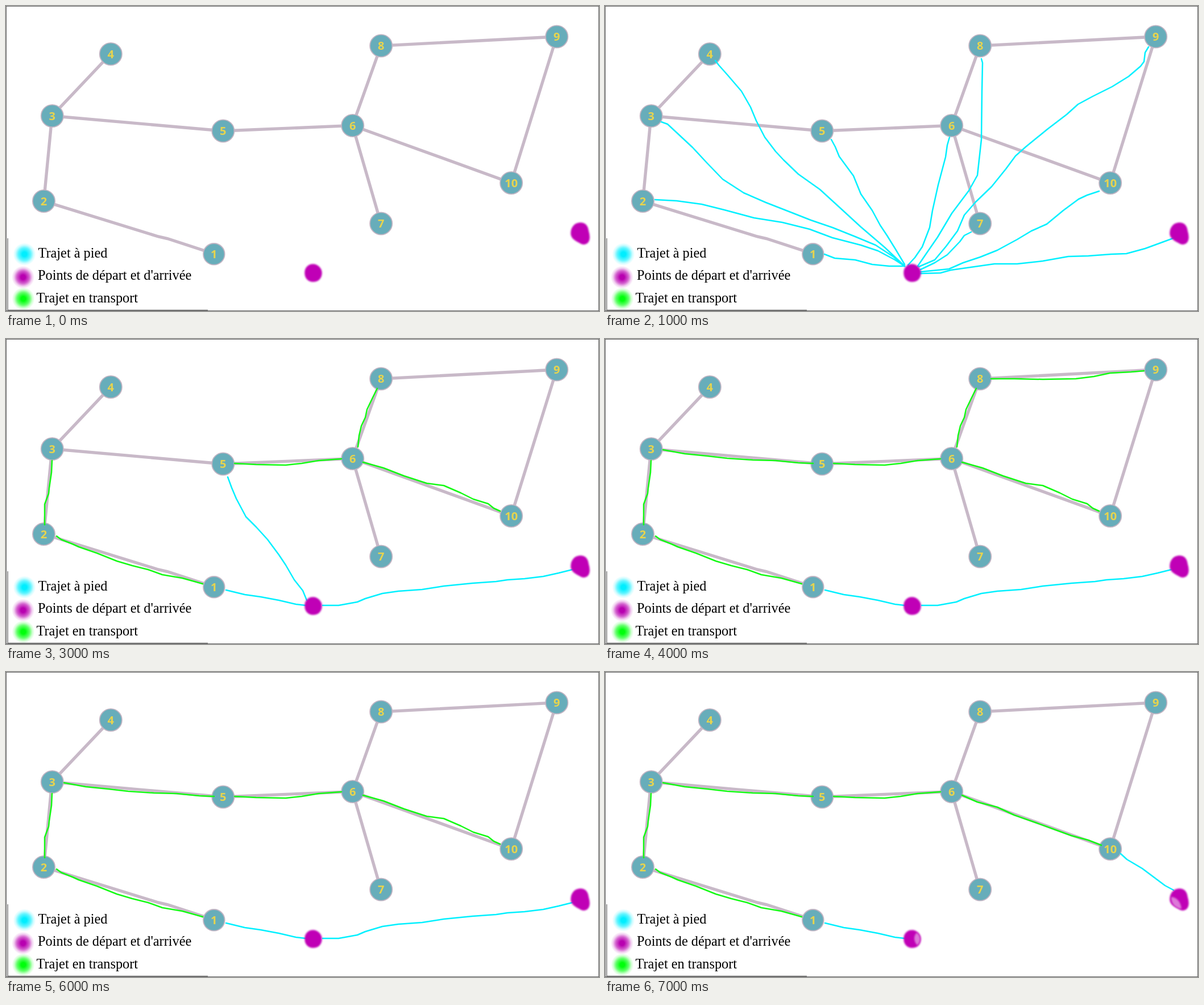
Recreate the animation shown at these times as an HTML page. Size 1043 by 537 pixels, loop 8 s.

```html
<!DOCTYPE html>
<html lang="fr">
<head>
<meta charset="utf-8">
<title>Trajets</title>
<style>
  html, body { margin: 0; width: 100%; height: 100%; overflow: hidden; background: #fff; }
  svg { display: block; width: 1043px; height: 537px; }
  .edges { stroke: #c8b9c8; stroke-width: 5.4; fill: none; }
  .nodes circle { fill: #67adba; stroke: #c0b4c3; stroke-width: 1.8; }
  .nodes text { font: bold 20px "Open Sans", "Noto Sans", sans-serif; fill: #e8d44d; text-anchor: middle; }
  .legend text { font: 24.3px "Liberation Serif", serif; fill: #000; }
  .frame { fill: none; stroke: #666; }
  .blob { fill: #c000b6; stroke: #c000b6; stroke-width: 1.5; filter: url(#soft); }
  .worn { fill: #dc7ad8; filter: url(#soft); }
  polyline { fill: none; stroke-width: 2.5; stroke-linecap: round; stroke-linejoin: round; }
  .walk { stroke: #00f0ff; }
  .ride { stroke: #14fa14; }

  /* one step = 1 s = 12.5 % ; groups are named after the steps they cover */
  .on { visibility: hidden; animation: 8s step-end infinite; }
  .s1 { animation-name: s1; }
  .s2 { animation-name: s2; }
  .s3 { animation-name: s3; }
  .s4 { animation-name: s4; }
  .s7 { animation-name: s7; }
  .s34 { animation-name: s34; }
  .s346 { animation-name: s346; }
  .s26 { animation-name: s26; }
  .s27 { animation-name: s27; }
  .s37 { animation-name: s37; }
  .s47 { animation-name: s47; }
  @keyframes s1 { 0%, 25%, 100% { visibility: hidden } 12.5% { visibility: visible } }
  @keyframes s2 { 0%, 37.5%, 100% { visibility: hidden } 25% { visibility: visible } }
  @keyframes s3 { 0%, 50%, 100% { visibility: hidden } 37.5% { visibility: visible } }
  @keyframes s4 { 0%, 62.5%, 100% { visibility: hidden } 50% { visibility: visible } }
  @keyframes s7 { 0%, 100% { visibility: hidden } 87.5% { visibility: visible } }
  @keyframes s34 { 0%, 62.5%, 100% { visibility: hidden } 37.5% { visibility: visible } }
  @keyframes s346 { 0%, 62.5%, 87.5%, 100% { visibility: hidden } 37.5%, 75% { visibility: visible } }
  @keyframes s26 { 0%, 87.5%, 100% { visibility: hidden } 25% { visibility: visible } }
  @keyframes s27 { 0%, 100% { visibility: hidden } 25% { visibility: visible } }
  @keyframes s37 { 0%, 100% { visibility: hidden } 37.5% { visibility: visible } }
  @keyframes s47 { 0%, 100% { visibility: hidden } 50% { visibility: visible } }
</style>
</head>
<body>
<svg viewBox="0 0 1043 537">
  <defs>
    <filter id="soft" x="-30%" y="-30%" width="160%" height="160%"><feGaussianBlur stdDeviation="1.6"/></filter>
    <radialGradient id="cyan"><stop offset=".2" stop-color="#00eeff"/><stop offset=".55" stop-color="#00eeff" stop-opacity=".62"/><stop offset=".8" stop-color="#00eeff" stop-opacity=".18"/><stop offset="1" stop-color="#00eeff" stop-opacity="0"/></radialGradient>
    <radialGradient id="plum"><stop offset=".2" stop-color="#b800b0"/><stop offset=".55" stop-color="#b800b0" stop-opacity=".62"/><stop offset=".8" stop-color="#b800b0" stop-opacity=".18"/><stop offset="1" stop-color="#b800b0" stop-opacity="0"/></radialGradient>
    <radialGradient id="lime"><stop offset=".2" stop-color="#00ff0c"/><stop offset=".55" stop-color="#00ff0c" stop-opacity=".62"/><stop offset=".8" stop-color="#00ff0c" stop-opacity=".18"/><stop offset="1" stop-color="#00ff0c" stop-opacity="0"/></radialGradient>
  </defs>

  <path class="edges" d="M184 84.5L81 193.500L66.500 343.500L268 406L284 409.500L365 436M81 193.500L382 220L609.500 210.500L659.500 70L968.500 54L888.500 311.500L609.500 210.500L659.500 383"/>

  <g class="nodes" id="nodes"></g>

  <g class="legend">
    <path d="M3 409V536M3 535.5H355" stroke="#777" stroke-width="1.5" fill="none"/>
    <circle cx="32.500" cy="437" r="20" fill="url(#cyan)"/>
    <circle cx="30" cy="477.500" r="20" fill="url(#plum)"/>
    <circle cx="30.500" cy="515.500" r="20" fill="url(#lime)"/>
    <text x="56.500" y="443">Trajet à pied</text>
    <text x="56" y="482">Points de départ et d'arrivée</text>
    <text x="53.500" y="521.500">Trajet en transport</text>
  </g>

  <g class="walk">
    <g class="on s1">
      <polyline points="194,96 200,104 216,122 240,150 256,178 266,202 281,231 300,256 314,271 340,296 378,323 413,355 450,389 492,425 527,458"/>
      <polyline points="99,204 110,208 124,221 154,249 180,277 207,305 244,329 283,346 329,364 362,377 400,390 440,406 476,421 508,442 527,458"/>
      <polyline points="88,341 126,343 170,349 210,359 262,373 312,381 360,393 400,408 450,421 480,431 510,447 527,458"/>
      <polyline points="386,437 404,444 440,447 470,455 500,458 527,458"/>
      <polyline points="398,235 405,248 412,265 437,299 450,331 470,360 484,386 496,404 509,425 527,455"/>
      <polyline points="606,231 602,245 599,266 586,315 576,360 571,390 558,424 545,443 533,456"/>
      <polyline points="662,93 664,100 663,150 662,235 655,298 640,325 610,365 585,407 565,436 550,458"/>
      <polyline points="956,72 950,82 948,98 942,106 921,124 892,142 858,159 832,173 812,191 778,217 740,248 722,264 705,287 680,318 652,345 632,368 620,396 600,423 580,447 552,459"/>
      <polyline points="644,398 632,404 624,415 602,438 580,452 555,464"/>
      <polyline points="869,326 848,333 833,340 806,360 777,384 750,396 725,411 690,430 660,442 630,452 605,463 555,468"/>
      <polyline points="999,409 980,416 950,427 917,436 890,437 850,440 815,441 770,449 725,454 685,454 650,459 608,465 590,470 555,471"/>
    </g>
    <g class="on s2">
      <polyline points="101,201 124,211 160,237 190,257 217,271 250,292 284,316 350,365 410,395 435,410 460,428 490,450 530,463"/>
      <polyline points="396,234 399,246 406,270 427,300 460,345 480,372 492,390 510,425 531,460"/>
      <polyline points="657,93 650,118 645,150 642,200 635,245 626,280 615,303 600,328 588,358 575,395 562,424 549,458"/>
    </g>
    <polyline class="on s3" points="390,243 397,262 405,281 422,313 440,331 460,353 480,380 492,398 507,424 522,443 529,460"/>
    <polyline class="on s27" points="387,442 420,450 448,454 480,460 510,467 527,469"/>
    <polyline class="on s26" points="557,469 585,469 618,463 632,457 662,448 690,444 732,441 770,435 820,430 862,427 882,424 912,422 945,418 972,412 996,406"/>
    <polyline class="on s7" points="907,320 918,330 945,346 965,361 985,376 1000,384"/>
  </g>

  <g class="ride">
    <g class="on s2">
      <polyline points="95,178 112,168 130,154 143,137 158,123 166,112 176,102"/>
      <polyline points="401,220 430,220 468,222 505,218 528,215 560,214 580,211 594,212"/>
    </g>
    <polyline class="on s2" points="679,70 720,70 770,71 828,70 860,66 888,60 925,58 948,56"/>
    <polyline class="on s4" points="679,70 720,70 770,71 828,70 860,66 888,60 925,58 948,56"/>
    <polyline class="on s27" points="89,347 97,353 117,361 128,366 160,377 195,391 222,399 250,406 275,415 310,421 346,431"/>
    <g class="on s37">
      <polyline points="81,214 80,235 76,262 75,272 68,291 68,327"/>
      <polyline points="402,219 440,221 492,222 520,219 550,214 590,211"/>
    </g>
    <polyline class="on s34" points="653,87 645,103 635,124 632,138 625,153 621,170 619,190"/>
    <polyline class="on s346" points="628,217 664,227 700,241 740,254 770,258 800,271 822,282 848,290 858,298 869,303"/>
    <polyline class="on s47" points="102,195 140,202 180,206 215,210 260,213 300,214 340,218 366,219"/>
    <polyline class="on s7" points="628,217 655,229 690,238 720,252 760,266 790,277 820,288 850,296 873,305"/>
  </g>

  <path class="blob" d="M540 455C548 455 555 462 555 470C555 479 549 485 540 485C531 485 526 478 526 470C526 461 532 455 540 455Z"/>
  <path class="blob" d="M1009 382C1018 381 1023 387 1024 396C1026 402 1027 407 1025 413C1022 420 1014 421 1008 416C1000 412 994 408 994 400C994 390 1000 383 1009 382Z"/>
  <g class="on s7 worn">
    <path d="M548 459C542 466 543 474 549 481C556 476 556 464 548 459Z"/>
    <path d="M996 396C1005 396 1013 405 1014 417C1006 416 995 410 996 396Z"/>
  </g>

  <rect class="frame" x=".5" y=".5" width="1042" height="536"/>
</svg>
<script>
  const stops = [[365.8, 436.8, 18.8], [66.5, 343.5], [81.3, 193.5], [184.3, 84.5], [381.8, 220],
                 [609.7, 210.5], [659.7, 383], [659.7, 70], [968.7, 54], [888.7, 311.5]];
  document.getElementById("nodes").innerHTML = stops.map(([x, y, r = 19.6], i) =>
    `<circle cx="${x}" cy="${y}" r="${r}"/><text x="${x}" y="${y + 7}">${i + 1}</text>`).join("");
</script>
</body>
</html>
```
